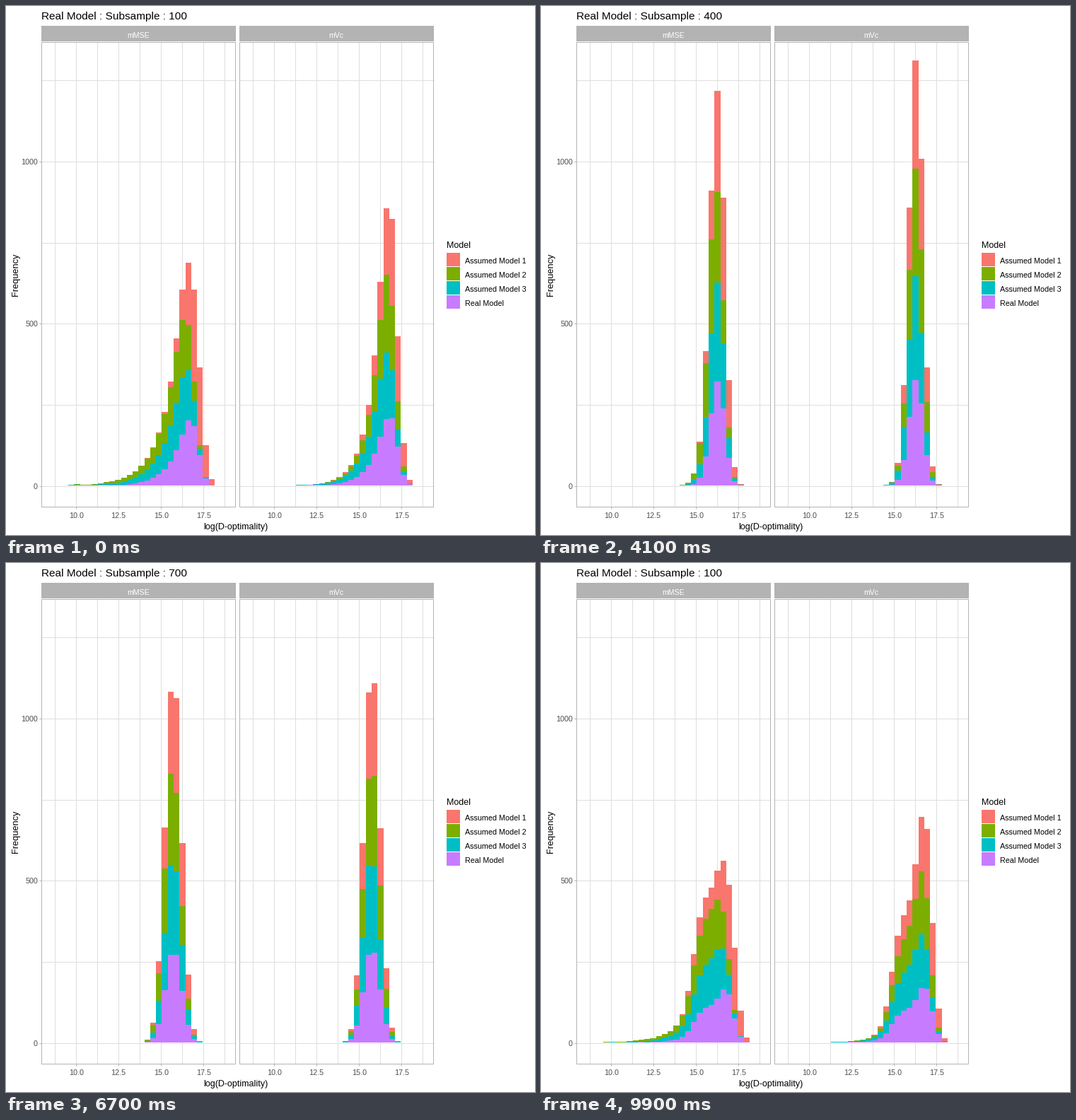
Recreate the animation shown at these times as a matplotlib script. Size 748 px wide and 748 px high, loop 10000 ms.

```python
import numpy as np
import matplotlib.pyplot as plt
from matplotlib.animation import FuncAnimation
from matplotlib.patches import Rectangle

SIZE, DPI = 748, 88
PX = 72 / DPI  # one pixel in points
COLORS = {
    "Assumed Model 1": "#F8766D",
    "Assumed Model 2": "#7CAE00",
    "Assumed Model 3": "#00BFC4",
    "Real Model": "#C77CFF",
}
GRID, GREY, TICK_TEXT = "#DEDEDE", "#B3B3B3", "#4D4D4D"

# Layout in pixels
BASE, UNIT = 678.1, 0.4585
PANEL_W, PANEL_STEP = 275, 280
BINS = np.arange(-19, 11)  # bin edges, 0 at log value 15
EDGES = np.round(63.35 + 8.27 * (BINS + 19))

# Per model, bottom of the stack first:
# tail length at 100, shift of the centre at 100 and at 300
SHAPES = {
    "mMSE": [(2.6, 0, 0.05), (3.3, -1, -0.1), (3.3, -1.25, -0.6), (1.2, 0.55, 0.28)],
    "mVc": [(2.3, 0.15, 0.08), (2.6, -0.45, -0.1), (1.9, -0.3, 0), (1.5, 0.45, 0.05)],
}
KEY_SIZES = [100, 300, 900]
# Quantiles of the unit exponential
TAIL = -np.log(1 - (np.arange(200) + 0.5) / 200)


def normal_cdf(z):
    return 0.5 + 0.5 * np.tanh(0.79788 * z * (1 + 0.044715 * z * z))


def histogram(n, tail, shift, shift_300):
    """Counts of 1000 values: a normal minus an exponential left tail."""
    centre = 6.6 - 0.0061 * n + np.interp(n, KEY_SIZES, [shift, shift_300, 0])
    spread = np.interp(n, KEY_SIZES, [0.98, 0.95, 1.47])
    lag = tail * 100 / n * TAIL[:, None]
    return 1000 * np.diff(normal_cdf((BINS + lag - centre) / spread).mean(axis=0))


# Stack tops: subsample, panel, model, bin
tops = np.cumsum([[[histogram(n, *shape) for shape in models]
                   for models in SHAPES.values()]
                  for n in range(100, 1000, 100)], axis=2)

# Alternating rests and linear moves
STEPS = [6, 6] + [5] * 7
key_frames, key_states, end = [], [], -1
for i, n in enumerate(STEPS):
    key_frames += [end + 6, end + 6 + n]
    key_states += [i, i + 1]
    end += 6 + n

plt.rcParams["font.family"] = "Liberation Sans"
fig = plt.figure(figsize=(SIZE / DPI, SIZE / DPI), dpi=DPI, facecolor="white")
ax = fig.add_axes([0, 0, 1, 1])
ax.set_xlim(0, SIZE)
ax.set_ylim(SIZE, 0)
ax.axis("off")


def text(x, y, s, px, color="black", ha="left", **kw):
    return ax.text(x, y, s, fontsize=px * PX, color=color, ha=ha,
                   va="baseline", **kw)


def line(xs, ys, color):
    ax.plot(xs, ys, color=color, lw=PX, zorder=1, solid_capstyle="butt")


def box(x, y, w, h, color):
    ax.add_patch(Rectangle((x, y), w, h, fc=color, lw=0, zorder=1))


def y_pos(count):
    return np.floor(BASE - UNIT * count) + 0.5


bars = []
for p, name in enumerate(SHAPES):
    left = 50 + PANEL_STEP * p
    right = left + PANEL_W
    for k in range(9):
        x = left + np.floor(19.5 + 30.05 * k) + 0.5
        line([x, x], [51, 708], GRID)
        if k % 2:
            line([x, x], [708, 711], GREY)
            text(x - 0.3, 724, f"{8.75 + 1.25 * k:.1f}", 10.75, TICK_TEXT, "center")
    for count in range(0, 1251, 250):
        line([left, right], [y_pos(count)] * 2, GRID)
    for z, color in enumerate(COLORS.values()):
        flat = np.full(len(BINS) - 1, 678.0)
        bars.append(ax.stairs(flat, EDGES + PANEL_STEP * p, baseline=678,
                              fill=True, color=color, lw=0,
                              antialiased=False, zorder=2 + 0.1 * z))
    ax.add_patch(Rectangle((left + 0.5, 50.5), PANEL_W - 1, 657, fill=False,
                           ec=GREY, lw=PX, zorder=4))
    box(left, 28, PANEL_W, 22, GREY)
    text(left + PANEL_W / 2 - 0.5, 44.5, name, 10.5, "white", "center")

for count in (0, 500, 1000):
    line([47, 50], [y_pos(count)] * 2, GREY)
    text(45, y_pos(count) + 4.5, str(count), 10.75, TICK_TEXT, "right")

title = text(50.5, 19, "", 15.4)
text(325, 740, "log(D-optimality)", 12.5, ha="center")
text(17, 379.5, "Frequency", 12.7, ha="center", rotation=90,
     rotation_mode="anchor")

text(623, 342, "Model", 12.5)
for i, (name, color) in enumerate(COLORS.items()):
    box(623, 349 + 20 * i, 19, 19, color)
    text(649, 363.5 + 20 * i, name, 10.75)


def update(frame):
    phase = np.interp(frame, key_frames, key_states)
    i, t = int(phase), phase % 1
    now = (1 - t) * tops[i % 9] + t * tops[(i + 1) % 9]
    heights = np.round(BASE - UNIT * now)
    for bar, h in zip(bars, heights[:, ::-1].reshape(len(bars), -1)):
        bar.set_data(values=h)
    nearest = int(np.ceil(phase - 0.5)) % 9
    title.set_text(f"Real Model : Subsample : {100 * (nearest + 1)}")
    return bars + [title]


anim = FuncAnimation(fig, update, frames=100, interval=100, repeat=True,
                     repeat_delay=0)
plt.show()
```
